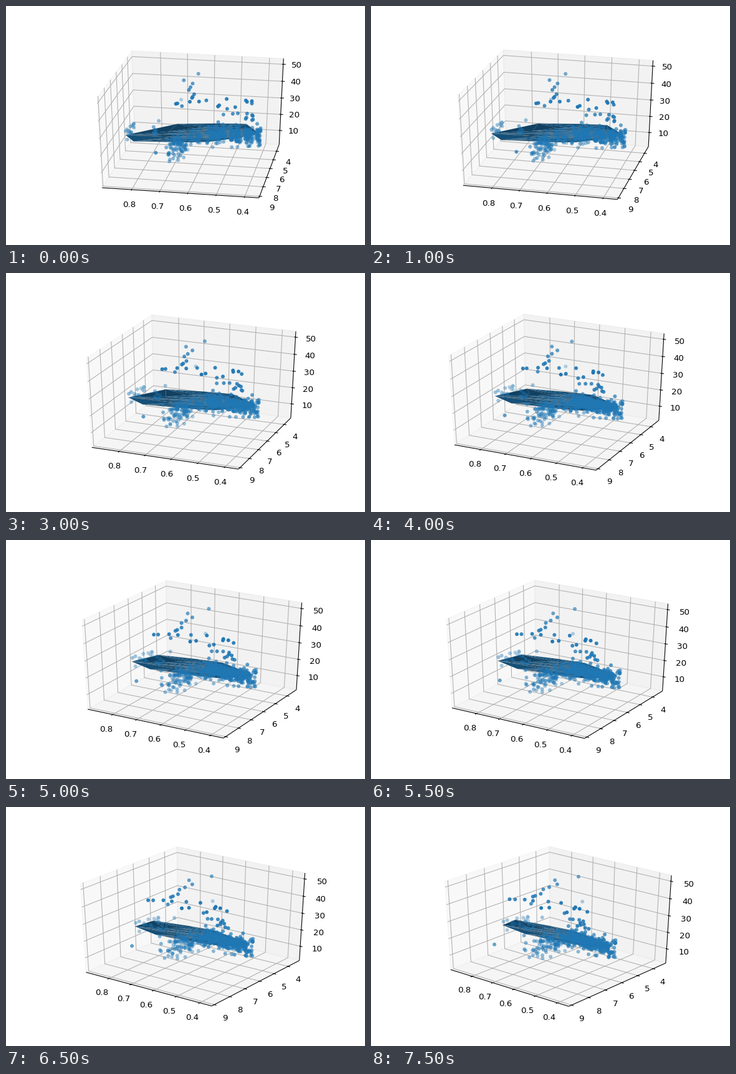
Write a matplotlib script that moves like this. It is 576x384 px and loops after 8000 ms.

```python
import numpy as np
import matplotlib.pyplot as plt
from matplotlib.animation import FuncAnimation
from matplotlib.collections import LineCollection, PolyCollection
from matplotlib.path import Path
from matplotlib.tri import Triangulation

W, H, DPI = 576, 384, 96
FRAMES, STEP_MS = 16, 500
AZIM0, AZIM_STEP, ELEV, DIST = 100, 2, np.radians(30), 10
CENTER = np.array([301.23, 187.12])
SCALE = np.array([446.4, -289.92]) / 0.185
LOW = np.array([0.3607, 3.300, 2.17])
HIGH = np.array([0.8953, 9.041, 52.28])
EDGE = 0.5 + 1 / 48          # panes reach a little past the limits
LABEL = EDGE + 0.0833
TICK_IN, TICK_OUT = EDGE - 0.1 / 12, EDGE + 0.2 / 12
BLUE = np.array([31, 119, 180]) / 255

rng = np.random.default_rng(7)


def to_unit(p):
    return (np.asarray(p, float) - LOW) / (HIGH - LOW) - 0.5


def project(p, azim):
    """Pixel positions and depths of points in the centred unit cube."""
    p = np.asarray(p, float)
    ca, sa, ce, se = np.cos(azim), np.sin(azim), np.cos(ELEV), np.sin(ELEV)
    right = np.array([-sa, ca, 0])
    up = np.array([-se * ca, -se * sa, ce])
    depth = DIST - p @ np.array([ce * ca, ce * sa, se])
    flat = np.stack([p @ right, p @ up], -1) / depth[..., None]
    return CENTER + flat * SCALE, depth


def plane_z(x, y):
    return -20.8 - 14 * x + 8 * y


def band(count, x_range, levels, y_mean, y_dev, z_mean, slope, noise):
    """Random points that share a few x levels; z follows y."""
    x = rng.choice(rng.uniform(*x_range, levels), count)
    y = rng.normal(y_mean, y_dev, count)
    y = np.clip(y, np.maximum(4.9, 7.85 - 5 * x), 7.9)
    z = z_mean + slope * (y - y_mean) + rng.normal(0, noise, count)
    return np.column_stack([x, y, np.clip(z, 5, 49)])


# Isolated points: on the ceiling, then elsewhere
top = [
    (.605, 7.49), (.605, 7.80), (.605, 8.38), (.605, 7.93), (.488, 7.83),
    (.422, 7.88), (.416, 8.03), (.504, 8.73), (.647, 8.70), (.575, 8.30),
    (.401, 7.92), (.631, 4.97), (.631, 6.68), (.631, 7.02), (.631, 6.22),
    (.668, 5.88),
]
apart = [
    (.718, 3.56, 27.5), (.718, 8.78, 21.9), (.659, 4.14, 11.9),
    (.647, 8.40, 48.8), (.647, 7.52, 43.1), (.507, 8.25, 48.3),
]
data = np.vstack([
    band(255, (.39, .55), 34, 6.35, .38, 22.5, 8, 2.6),
    band(16, (.39, .60), 12, 7.45, .25, 39, 10, 4),
    band(85, (.53, .64), 9, 6.0, .38, 18, 5, 2.8),
    band(105, (.66, .74), 8, 6.05, .50, 12.5, 1, 3.4),
    band(15, (.871, .871), 1, 5.65, .45, 17, 3, 2.5),
    band(8, (.77, .77), 1, 6.1, .30, 21, 3, 2),
    [(x, y, 50) for x, y in top],
    apart,
])
points = to_unit(data)

# Fitted plane over part of the points
hull = [
    (.871, 6.5), (.871, 5.14), (.671, 4.65), (.597, 4.63), (.439, 5.6),
    (.392, 6.1), (.416, 8.03), (.504, 8.26), (.647, 8.40),
]
inside = data[Path(hull).contains_points(data[:, :2]), :2]
base = np.vstack([hull, inside[rng.choice(len(inside), 110, replace=False)]])
mesh = Triangulation(*base.T).triangles
plane = to_unit(np.column_stack([base, plane_z(*base.T)]))
shade = rng.uniform(0.52, 0.72, len(mesh))

# Box: back corner, and the free edge that carries each axis
back = np.array([EDGE, -EDGE, -EDGE])
edges = np.array([[0, 1, -1], [-1, 0, -1], [-1, -1, 0]])
tick_dirs = [1, 0, 0]
tick_values = [np.arange(4, 9) / 10, np.arange(4, 10), np.arange(10, 51, 10)]

panes, grid, lines, labels = [], [], [], []
for k in range(3):
    i, j = (k + 1) % 3, (k + 2) % 3
    quad = np.tile(back, (4, 1))
    quad[1:3, i] *= -1
    quad[2:4, j] *= -1
    panes.append(quad)

    ends = np.tile(edges[k] * EDGE, (2, 1))
    ends[:, k] = -EDGE, EDGE
    lines.append(ends)
    for v in tick_values[k]:
        at = (v - LOW[k]) / (HIGH[k] - LOW[k]) - 0.5
        bend = np.tile(back, (3, 1))
        bend[0, i] *= -1
        bend[2, j] *= -1
        bend[:, k] = at
        grid.append(bend)

        tick = np.tile(edges[k] * EDGE, (2, 1))
        d = tick_dirs[k]
        tick[:, d] = edges[k][d] * np.array([TICK_IN, TICK_OUT])
        tick[:, k] = at
        lines.append(tick)

        spot = edges[k] * LABEL
        spot[k] = at
        labels.append((spot, f"{v:g}"))
panes, grid, lines = map(np.array, (panes, grid, lines))
spots = np.array([s for s, _ in labels])

fig = plt.figure(figsize=(W / DPI, H / DPI), dpi=DPI, facecolor="white")
ax = fig.add_axes([0, 0, 1, 1])
ax.set(xlim=(0, W), ylim=(H, 0))
ax.axis("off")

pane_colors = [(g, g, g, 0.5) for g in (0.95, 0.90, 0.925)]
pane_art = PolyCollection([], facecolors=pane_colors, edgecolors=pane_colors,
                          linewidths=1, zorder=1)
grid_art = LineCollection([], colors="#b0b0b0", linewidths=0.8, zorder=2)
line_art = LineCollection([], colors="black", linewidths=0.8, zorder=3)
mesh_art = PolyCollection([], facecolors=shade[:, None] * BLUE,
                          edgecolors="none", zorder=4)
for art in (pane_art, grid_art, line_art, mesh_art):
    ax.add_collection(art, autolim=False)
dots = ax.scatter(*np.zeros((2, len(points))), s=20, linewidths=0, zorder=5)
texts = [ax.text(0, 0, s, fontsize=10, family="DejaVu Sans",
                 ha="center", va="top", zorder=3) for _, s in labels]


def draw(n):
    azim = np.radians(AZIM0 + AZIM_STEP * n)
    pane_art.set_verts(project(panes, azim)[0])
    grid_art.set_segments(project(grid, azim)[0])
    line_art.set_segments(project(lines, azim)[0])
    mesh_art.set_verts(project(plane, azim)[0][mesh])
    for text, pos in zip(texts, project(spots, azim)[0]):
        text.set_position(pos)

    # Far points fade
    xy, depth = project(points, azim)
    z = -1 / depth
    alpha = 1 - 0.7 * (z - z.min()) / (z.max() - z.min())
    dots.set_offsets(xy)
    dots.set_facecolor(np.column_stack([np.tile(BLUE, (len(xy), 1)), alpha]))
    return [pane_art, grid_art, line_art, mesh_art, dots, *texts]


anim = FuncAnimation(fig, draw, frames=FRAMES, interval=STEP_MS,
                     repeat=True, repeat_delay=0)
plt.show()
```
